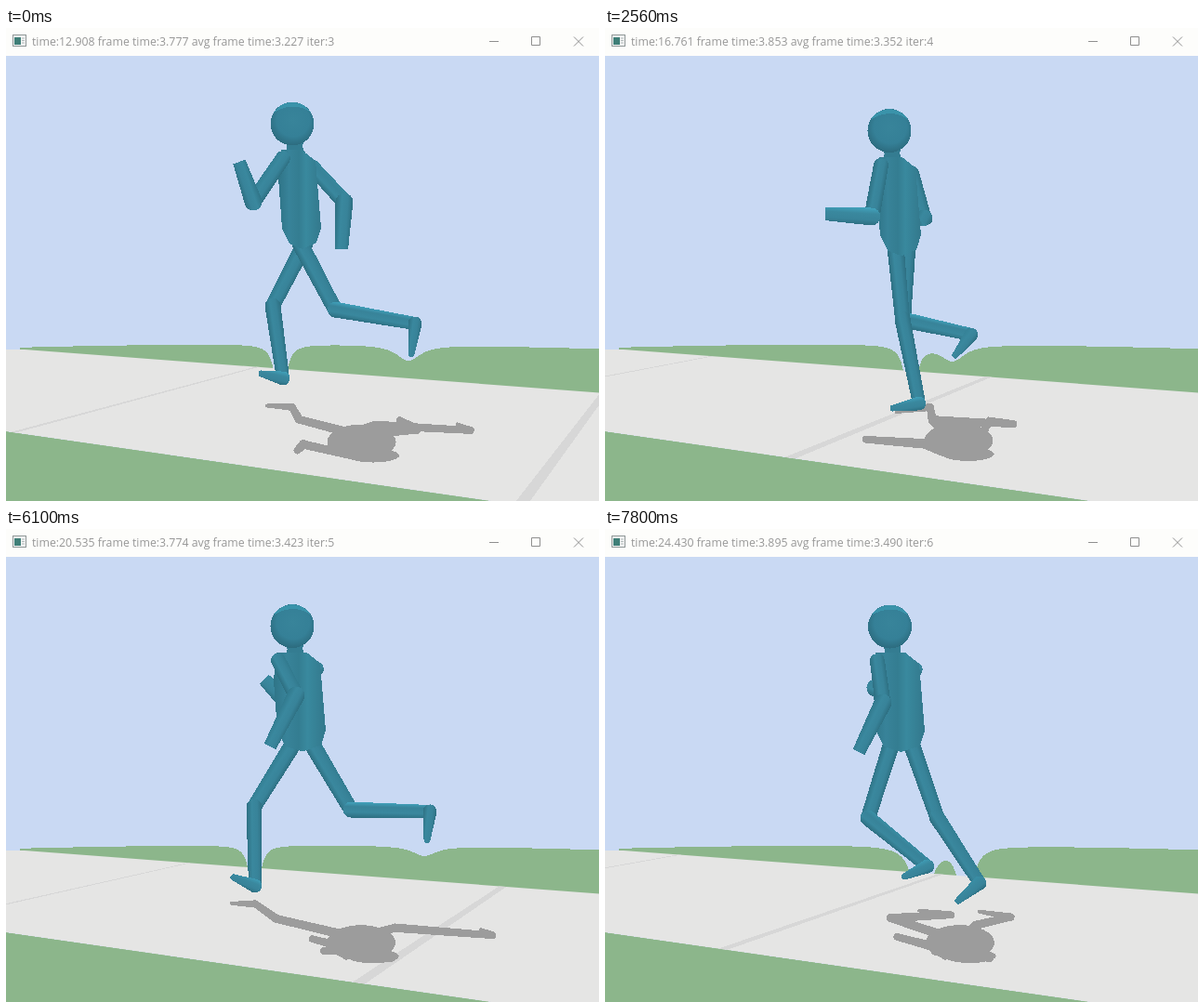
Animation, 638 px wide and 509 px high, one loop 8 s. Source, as an HTML page:

```html
<!DOCTYPE html>
<html lang="en">
<head>
<meta charset="utf-8">
<title>Runner</title>
<style>
html, body { margin: 0; width: 100%; height: 100%; overflow: hidden; background: #c9d9f3; }
svg { display: block; width: 638px; height: 509px; }
text { font: 12.3px "Open Sans", "Noto Sans", sans-serif; fill: #979797; }
</style>
</head>
<body>
<svg viewBox="0 0 638 509">
  <defs>
    <clipPath id="floor"><path d="M0 346L20 346L638 392.5V509H522L0 434Z"/></clipPath>
    <linearGradient id="trunk">
      <stop offset="0" stop-color="#2f7487"/><stop offset=".25" stop-color="#388399"/>
      <stop offset=".48" stop-color="#347d91"/><stop offset=".65" stop-color="#39899e"/>
      <stop offset="1" stop-color="#33788c"/>
    </linearGradient>
    <radialGradient id="skull" cx=".52" cy=".42" r=".58">
      <stop offset="0" stop-color="#38849a"/><stop offset=".65" stop-color="#358097"/>
      <stop offset="1" stop-color="#2c6b7e"/>
    </radialGradient>
  </defs>
  <rect width="638" height="509" fill="#c9d9f3"/>
  <g id="scene" shape-rendering="crispEdges"></g>
  <rect width="638" height="30" fill="#fdfdfb"/>
  <rect x="7.5" y="7.5" width="14" height="12" fill="#f2f4f4" stroke="#8f9696"/>
  <rect x="9" y="10" width="7" height="8" fill="#3f7f78"/>
  <path d="M17 11h3M17 13.5h3M17 16h3" stroke="#b4baba"/>
  <text id="title" x="28" y="19"></text>
  <path d="M520 14.5h10M565.5 9.5h9v9h-9zM611 9.5l10 10m0 -10l-10 10" fill="none" stroke="#8f8f8f"/>
</svg>
<script>
const DURATION = 8000;
const TIME_BEFORE = 9.131, FIRST_ITER = 3;

// Key poses. Arms: elbow, hand. Legs: knee, ankle, toe.
// seam: where the first tile joint meets the far edge of the floor.
const poses = [
  {
    start: 0, cost: 3.777, seam: 270, head: [308, 103], width: 20, hips: 2,
    backArm: [[364, 187], [361, 238]], frontArm: [[266, 187], [251, 144]],
    backLeg: [[287, 299], [298, 377], [275, 372]],
    frontLeg: [[354, 303], [440, 318], [436, 351]]
  },
  {
    start: 400, cost: 3.853, seam: 115, head: [306, 110.5], width: 21, hips: 6,
    backArm: [[343, 205], [341, 209]], frontArm: [[287, 203], [237, 200]],
    backLeg: [[321, 314], [394, 330], [377, 352]],
    frontLeg: [[320, 313], [338, 404], [310, 409]]
  },
  {
    start: 4000, cost: 3.774, seam: 197, head: [308, 104.5], width: 25, hips: 12,
    backArm: [[300, 184], [278, 162]], frontArm: [[312, 179], [284, 234]],
    backLeg: [[371, 302], [456, 304], [453, 335]],
    frontLeg: [[267, 299], [268, 384], [245, 375]]
  },
  {
    start: 7500, cost: 3.895, seam: 80, head: [306.5, 105], width: 25, hips: 12,
    backArm: [[291, 171], [310, 180]], frontArm: [[299, 187], [273, 240]],
    backLeg: [[357, 310], [403, 381], [380, 400]],
    frontLeg: [[283, 311], [347, 363], [322, 374]]
  }
];

const scene = document.getElementById('scene');
const title = document.getElementById('title');

function add(parent, tag, attrs) {
  const node = document.createElementNS('http://www.w3.org/2000/svg', tag);
  for (const key in attrs) node.setAttribute(key, attrs[key]);
  return parent.appendChild(node);
}

// Tapered bar between two points, with round or flat far end
function bar([x1, y1], r1, [x2, y2], r2, flat) {
  const len = Math.hypot(x2 - x1, y2 - y1) || 1;
  const nx = -(y2 - y1) / len, ny = (x2 - x1) / len;
  const pt = (x, y, r) => `${(x + nx * r).toFixed(2)} ${(y + ny * r).toFixed(2)}`;
  const d = `M${pt(x1, y1, r1)}L${pt(x2, y2, r2)}${flat ? 'L' : `A${r2} ${r2} 0 0 0 `}${pt(x2, y2, -r2)}` +
    `L${pt(x1, y1, -r1)}A${r1} ${r1} 0 0 0 ${pt(x1, y1, r1)}Z`;
  return { d, nx, ny };
}

// Edge colour of a limb: brighter the more it faces up
function shade(up) {
  const dark = [45, 110, 128], lit = [66, 164, 190];
  const k = Math.max(0, up) ** 2;
  return `rgb(${dark.map((v, i) => Math.round(v + (lit[i] - v) * k))})`;
}

let gradients = 0;
function drawBone(parent, { from, r1, to, r2, flat }) {
  const { d, nx, ny } = bar(from, r1, to, r2, flat);
  const id = 'bone' + gradients++;
  const r = Math.max(r1, r2), mx = (from[0] + to[0]) / 2, my = (from[1] + to[1]) / 2;
  const grad = add(parent, 'linearGradient', {
    id, gradientUnits: 'userSpaceOnUse',
    x1: mx - nx * r, y1: my - ny * r, x2: mx + nx * r, y2: my + ny * r
  });
  const stops = [[0, shade(ny)], [.3, '#388399'], [.65, '#3a889e'], [1, shade(-ny)]];
  for (const [offset, color] of stops) add(grad, 'stop', { offset, 'stop-color': color });
  add(parent, 'path', { d, fill: `url(#${id})` });
}

function arm(shoulder, [elbow, hand]) {
  return [
    { from: shoulder, r1: 8, to: elbow, r2: 8.5 },
    { from: elbow, r1: 9.5, to: hand, r2: 7, flat: true }
  ];
}

function leg(hip, [knee, ankle, toe]) {
  return [
    { from: hip, r1: 9, to: knee, r2: 8 },
    { from: knee, r1: 8.5, to: ankle, r2: 7 },
    { from: ankle, r1: 7.5, to: toe, r2: 3.5 }
  ];
}

function skeleton({ head, width, hips, backArm, frontArm, backLeg, frontLeg }) {
  const top = head[1] + 28, left = 313 - width, right = 313 + width;
  return {
    top, left, right,
    backArm: arm([right - 4, top + 18], backArm),
    frontArm: arm([left + 5, top + 9], frontArm),
    backLeg: leg([319 + hips, top + 102], backLeg),
    frontLeg: leg([319 - hips, top + 102], frontLeg)
  };
}

// The horizon sinks around each leg that reaches it
function legDip([knee, ankle, toe]) {
  if (ankle[1] < 358) return { x: toe[0] - 3, depth: (toe[1] - 308) * .4, spread: 16 };
  const slope = (ankle[0] - knee[0]) / (ankle[1] - knee[1]);
  return { x: knee[0] + slope * (358 - knee[1]), depth: 110, spread: 4 + 3 * Math.abs(slope) };
}

function hills(dips) {
  let d = 'M15 400';
  for (let x = 15; x <= 638; x++) {
    let y = 340 + 5 * ((x - 300) / 330) ** 2;
    for (const dip of dips) y += dip.depth / (1 + ((x - dip.x) / dip.spread) ** 2);
    d += `L${x} ${Math.min(y, 400).toFixed(1)}`;
  }
  return d + 'V400Z';
}

// Tile joint from the far edge to the near edge of the floor
function seam(far) {
  const u = far - 270;
  const near = 8 + 1.27 * u + .00051 * u * u;
  const w = Math.max(1.5, 2 + .019 * near) / 2;
  const a = [near, 434 + near * 75 / 522], b = [far, 346 + (far - 20) * .0752];
  const along = k => [0, 1].map(i => a[i] + (b[i] - a[i]) * k);
  return bar(along(-.04), w, along(1.04), w * .5).d;
}

// Where a body point falls on the floor
function cast([x, y], shift = 0) {
  return [42 + 1.238 * x - .274 * y, Math.max(448.5 + .1 * x - .187 * y + shift, y + 4)];
}

function drawShadow(parent, pose, body) {
  const g = add(parent, 'g', { fill: '#9c9c9c' });
  const blob = (p, rx, ry) => {
    const [cx, cy] = cast(p);
    add(g, 'ellipse', { cx, cy, rx, ry });
  };
  const bones = (list, shift) => list.forEach(b =>
    add(g, 'path', { d: bar(cast(b.from, shift), b.r1 * .55, cast(b.to, shift), b.r2 * .55).d }));
  for (const side of ['back', 'front']) {
    bones(body[side + 'Leg'], 0);
    bones(body[side + 'Arm'], pose[side + 'Arm'][1][0] > 319 ? -18 : 8);
  }
  blob([316, body.top + 54], 37, 19);
  blob(pose.head, 28, 7.5);
}

function drawTrunk(parent, [hx, hy], { top, left, right }) {
  add(parent, 'path', {
    d: `M${hx - 9} ${hy + 19}Q${hx - 3} ${hy + 25} ${hx - 7} ${hy + 31}H${hx + 14}Q${hx + 9} ${hy + 25} ${hx + 13} ${hy + 18}Z`,
    fill: '#347c91'
  });
  add(parent, 'path', {
    d: `M${left + 3} ${top}H${right - 15}L${right} ${top + 12}L${right + 6} ${top + 84}L${right + 1} ${top + 100}` +
      `L319 ${top + 107}L${left + 12} ${top + 101}L${left + 4} ${top + 85}L${left} ${top + 30}Z`,
    fill: 'url(#trunk)', stroke: 'none'
  });
}

function drawHead(parent, [cx, cy]) {
  add(parent, 'circle', { cx, cy, r: 23.5, fill: 'url(#skull)' });
  add(parent, 'path', {
    d: `M${cx - 20} ${cy - 12}A23.5 23.5 0 0 1 ${cx + 20} ${cy - 12}Q${cx + 2} ${cy - 25} ${cx - 20} ${cy - 12}Z`,
    fill: '#3a93aa'
  });
}

function build(pose) {
  const g = add(scene, 'g', { display: 'none' });
  const body = skeleton(pose);
  add(g, 'path', { d: hills([legDip(pose.backLeg), legDip(pose.frontLeg)]), fill: '#8cb68b' });
  add(g, 'path', { d: 'M0 434L522 509H0Z', fill: '#8cb68b' });

  const floor = add(g, 'g', { 'clip-path': 'url(#floor)' });
  add(floor, 'rect', { width: 638, height: 509, fill: '#e5e5e4' });
  for (const far of [pose.seam, 1.49 * pose.seam + 241])
    add(floor, 'path', { d: seam(far), fill: '#d7d7d7' });
  drawShadow(floor, pose, body);

  for (const bone of [...body.backArm, ...body.backLeg, ...body.frontLeg]) drawBone(g, bone);
  drawTrunk(g, pose.head, body);
  for (const bone of body.frontArm) drawBone(g, bone);
  drawHead(g, pose.head);
  return g;
}

let total = TIME_BEFORE;
const titles = poses.map(({ cost }, i) => {
  const iter = FIRST_ITER + i;
  total += cost;
  const avg = total / (iter + 1) + 1e-6;
  return `time:${total.toFixed(3)} frame time:${cost.toFixed(3)} avg frame time:${avg.toFixed(3)} iter:${iter}`;
});
const groups = poses.map(build);
let shown = -1;

function update(t) {
  const now = poses.filter(pose => t >= pose.start).length - 1;
  if (now === shown) return;
  shown = now;
  groups.forEach((g, i) => g.setAttribute('display', i === now ? 'inline' : 'none'));
  title.textContent = titles[now];
}

const begin = performance.now();
function tick() {
  update(Math.max(0, performance.now() - begin) % DURATION);
  requestAnimationFrame(tick);
}
tick();
</script>
</body>
</html>
```
